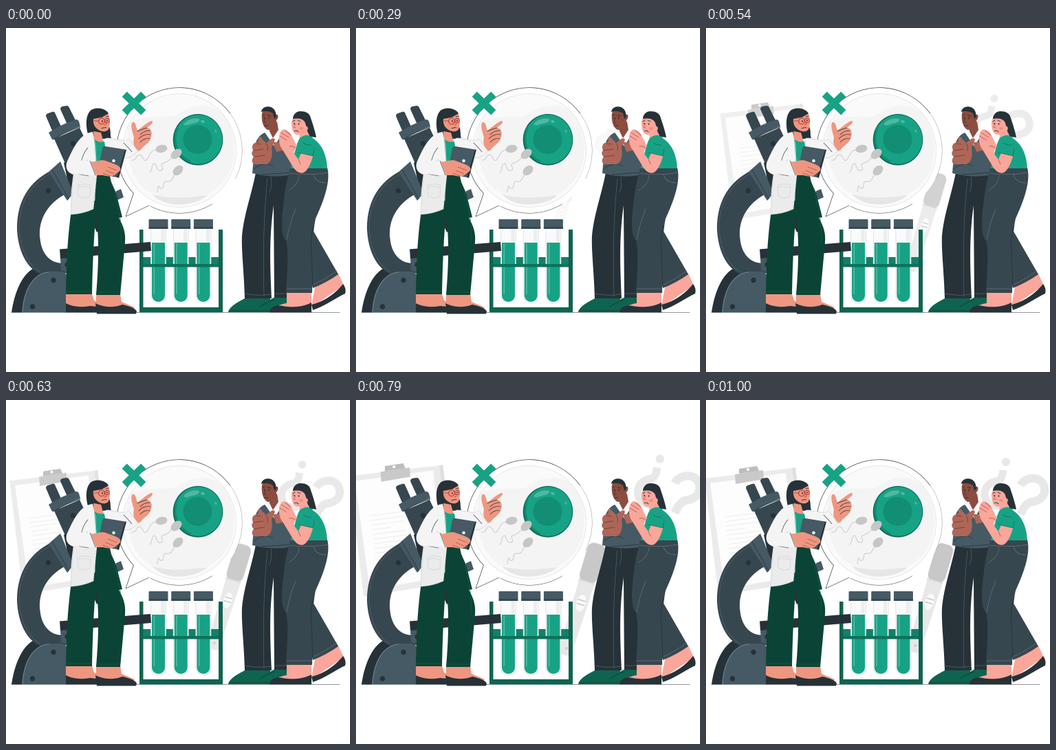
An HTML page with a canvas for the animation above (1040 ms loop, 500 by 500 pixels).

```html
<!DOCTYPE html>
<html lang="en">
<head>
<meta charset="utf-8">
<title>Clinic scene</title>
<style>
html, body { margin: 0; width: 100%; height: 100%; overflow: hidden; background: #fff; }
canvas { display: block; width: 500px; height: 500px; }
</style>
</head>
<body>
<canvas id="stage"></canvas>
<script>
const INK = '#263238', SLATE = '#37474f', STEEL = '#455a64', GREEN = '#18a285', PINE = '#0f6450',
  PANTS = '#0b4436', SKIN = '#ee9680', ROSE = '#faa69b', BROWN = '#ae6659', DARKBROWN = '#8c4d40',
  COAT = '#f4f4f4', SHADE = '#ebebeb';
const LOOP = 1040, FPS = 24, RES = 2, PAD = 20;
const CENTER = { x: 249, y: 228 };
let g;

function layer(pad, draw) {
  const c = document.createElement('canvas');
  c.width = c.height = (500 + 2 * pad) * RES;
  g = c.getContext('2d');
  g.scale(RES, RES);
  g.translate(pad, pad);
  g.lineCap = g.lineJoin = 'round';
  draw();
  return c;
}
function fill(color, d) {
  g.fillStyle = color;
  g.fill(new Path2D(d));
}
function line(color, w, d) {
  g.strokeStyle = color;
  g.lineWidth = w;
  g.stroke(new Path2D(d));
}
function oval(color, x, y, rx, ry = rx, turn = 0) {
  g.fillStyle = color;
  g.beginPath();
  g.ellipse(x, y, rx, ry, turn, 0, 7);
  g.fill();
}
function ring(color, w, x, y, r, from = 0, to = 2 * Math.PI) {
  g.strokeStyle = color;
  g.lineWidth = w;
  g.beginPath();
  g.arc(x, y, r, from, to);
  g.stroke();
}
function box(color, x, y, w, h, r = 0) {
  g.fillStyle = color;
  g.beginPath();
  g.roundRect(x, y, w, h, r);
  g.fill();
}

function clipboard() {
  fill('#e0e0e0', 'M124 99L130 98L149 262L143 264Z');
  fill('#ebebeb', 'M-2 114L125 99L144 264L18 284Z');
  fill('#fdfdfd', 'M6 121L116 106L135 255L27 275Z');
  for (let i = 0; i < 10; i++) {
    const x = 28 + i * .8, y = 170 + i * 6.6, w = i % 4 == 3 ? 26 : 46;
    line('#e8e8e8', .8, `M${x} ${y}l${w} ${-w * .13}`);
  }
  fill('#c9c9c9', 'M42 108L83 102L84 115L43 122Z');
  fill('#bdbdbd', 'M48 107V100L74 96L77 103Z');
  oval('#fff', 61, 101, 2);
}
function testStick() {
  g.save();
  g.translate(348.5, 209.5);
  g.rotate(.29);
  fill('#e8e8e8', 'M-11 50H12L9 158Q8 164 2 164H-4Q-10 164-10 158Z');
  box('#c8c8c8', -12.5, 0, 26, 56, 9);
  box('#dedede', -12, 55, 24, 2);
  oval('#fafafa', 1, 87, 6.5, 12);
  line('#c8c8c8', 1.5, 'M-4 83H6M-4 89H6');
  oval('#cfcfcf', 0, 154, 2);
  g.restore();
}
function questions() {
  g.lineCap = 'butt';
  oval('#e8e8e8', 436, 90, 6);
  line('#e8e8e8', 11, 'M432 102C430 118 426 117 418 119C404 124 402 138 409 148C414 154 424 156 430 152');
  line('#e8e8e8', 12, 'M457 124C463 112 484 110 490 122C497 138 486 146 474 148C466 149 462 156 457 166');
}

function bubble() {
  fill('#fff', 'M183 241L174 274L206 258Z');
  oval('#fff', 252, 178, 91.3);
  ring(INK, .65, 252, 178, 91.3, 2.39, 5.65);
  ring('#8d9396', .5, 252, 178, 91.3, 5.65, 6.75);
  ring(INK, .5, 252, 178, 91.3, 1.02, 2.05);
  line(INK, .65, 'M185.5 240L174 274L208 258');
  oval('#fafafa', 252, 178, 82.5);
  fill('#f4f4f4', 'M180 138C195 126 220 130 246 128C275 106 310 106 325 142C341 178 329 226 292 242C260 254 230 247 208 238C180 224 169 168 180 138Z');
  fill('#e6e6e6', 'M212 241C237 250 270 246 293 243C277 258 232 265 212 241Z');
  ring('#e0e0e0', .7, 252, 178, 82.5);

  oval('#0b6c56', 279, 162.3, 36.3, 37.3);
  oval(GREEN, 279.5, 162, 34.8, 35.8);
  line('#128a70', 3, 'M249 145C241 166 249 185 267 194');
  oval('#118e73', 278.5, 162, 21);
  fill('#4fb7a0', 'M258 140C263 133 273 130 281 132C282 136 277 138 271 139C264 141 262 143 258 140Z');
  oval('#4fb7a0', 286, 136, 3, 2, .4);
  oval('#4fb7a0', 305, 150, 1.4, 2, -.4);

  line('#d2d2d2', 1.2, 'M220 177C210 177 210 184 205 191C200 197 199 184 194 184C189 184 190 193 183 192');
  line('#d2d2d2', 1.2, 'M242 187C235 195 232 195 228 197C222 199 232 205 225 207C217 209 219 193 214 198C211 201 213 207 209 210');
  line('#d2d2d2', 1.2, 'M245 213C240 222 240 224 233 223C227 223 231 231 227 233C221 235 224 226 221 231L220 238');
  oval('#c6c6c6', 226, 175.5, 8.5, 5.6, -.2);
  oval('#c6c6c6', 247.5, 183, 9, 6, -.7);
  oval('#c6c6c6', 250, 207, 8.4, 6, -.75);

  g.lineCap = 'butt';
  line(GREEN, 10.2, 'M172.2 96.2L199.8 122.8M199.8 96.2L172.2 122.8');
  g.lineCap = 'round';
}

function rack() {
  box('#14806a', 198, 333, 112, 12);
  box(PINE, 194, 293, 5.5, 120.5);
  box(PINE, 309, 293, 6, 120.5);
  box(PINE, 199, 406, 111, 7.5);
  for (let x = 207.5; x < 280; x += 32.7) {
    box('#fafafa', x + 3, 290, 22, 110, [0, 0, 11, 11]);
    line('#d5dcdb', .7, `M${x + 3} 292V389a11 11 0 0 0 22 0V292`);
    box('#ededed', x + 18, 292, 5, 20);
    box(GREEN, x + 4.5, 312, 19, 86, [0, 0, 9.5, 9.5]);
    box('#56b9a4', x + 7, 313, 1.6, 74, 1);
    box(STEEL, x, 278, 28, 14, 1);
    box(SLATE, x, 289, 28, 3);
  }
  box('#0f705b', 199, 343, 110, 4.5);
}

function microscope() {
  fill(INK, 'M8 413.5C12 386 22 360 39 350L62 354L60 413.5Z');
  fill(SLATE, 'M66 207C34 223 16 251 16 291C17 323 30 350 51 358L93 356L93 340C70 347 52 333 49.5 306C46 276 64 250 94 238L85 208Z');
  line(STEEL, 1.2, 'M66 211C36 226 19 254 19 291C20 320 32 344 49 354');
  fill(STEEL, 'M23 413.5C25 380 39 356 62 354H79C87 354 91 361 91 372V413.5Z');
  line('#78909c', .8, 'M24 413C26 381 39 357 62 355');
  oval(INK, 61.5, 236.5, 3.7);
  oval(INK, 69, 366.5, 3.7);
  oval(INK, 38.5, 405, 3.7);
  fill(SLATE, 'M70 161L107 145L136 206L98 224Z');
  fill(INK, 'M84 196L100 190L139 291L132 297L100 225L96 252Z');
  fill(STEEL, 'M62 209L79 194L98 240L89 251Z');
  line(SLATE, 1.5, 'M67 206L91 248');
  fill(SLATE, 'M58 128Q58 125 61 124L67 122Q70 121 71 123L80 143L67 149ZM79 118Q79 115 82 114L88 113Q91 113 92 116L101 134L89 140Z');
  fill(STEEL, 'M62 152Q82 139 102 133Q105 133 106 136L108 143Q89 150 70 162Q67 163 66 160Z');
  line(INK, .7, 'M70 161Q89 150 108 144');
  oval(INK, 97.5, 168, 3.8);
  fill(STEEL, 'M158 238L167 234L171 246L162 250Z');
  fill(STEEL, 'M79 334H92V356L80 352Z');
  oval(INK, 89, 344, 3.7);
  fill(INK, 'M78 321.5L210 311L211 324L79 335Z');
}

function doctor() {
  // legs and shoes
  fill(SKIN, 'M87 386H125L128 396L148 405L145 410H87ZM131 386H166L168 398L187 406L185 409H131Z');
  fill(INK, 'M87 400C98 406 112 406 122 404C131 405 142 405 146 410V413.5H87ZM130 400C141 406 157 407 169 402C178 404 188 407 190 412L189 415.5H132Z');
  fill(PANTS, 'M96 258L133 250C128 290 126 340 125 387H87C88 340 89 305 96 258Z');
  fill(PANTS, 'M131 205H153L158 232L169 275L164 276C172 290 174 300 173 312L166 388H131C135 340 136 300 129 258Z');
  line('#155c4a', .7, 'M88 383H125M131 384H165M158 240C165 265 169 290 167 312');

  // hair and torso
  fill(INK, 'M119 154C116 143 115 126 124 119C133 114 146 117 149 126L150 143C153 150 151 156 153 160L131 162Z');
  fill(SKIN, 'M127 150L138 152L142 166L128 164Z');
  fill(GREEN, 'M127 161Q135 167 143 165L151 214H130Z');
  fill(COAT, 'M145 160C156 158 169 167 179 161L192 178C187 186 176 191 169 188L158 184L154 216L148 200Z');
  fill(COAT, 'M150 211L156 214L160 240L153 224Z');
  fill(COAT, 'M126 151C108 153 98 173 88 196C86 206 91 211 98 213L132 214L129 170Z');
  fill(SHADE, 'M98 212C94 236 94 255 94 271Q112 270 127 263L132 213Z');
  line('#cfd5d7', .7, 'M126 152L130 170L132 212L127 263Q112 270 94 271L98 213M146 161C157 159 169 167 179 161M169 188C176 191 187 186 192 178');
  line(INK, .6, 'M119 174Q111 183 109 197M98 211L120 215M102 196L119 192M171 167Q178 174 183 180');
  line('#d3d8d9', .8, 'M104 229Q113 225 123 228L122 245Q114 249 105 244ZM104 232Q113 229 122 232');

  // tablet and hands
  fill(INK, 'M144 172L175 177L164 218L161 217Z');
  fill(STEEL, 'M143 172Q141 172 140 175L133 212L161 217L173 177Z');
  oval('#eceff1', 156.5, 193, 2.3);
  fill(COAT, 'M100 193L122 192L130 214L97 212Z');
  fill(SKIN, 'M123 194C130 196 137 190 145 193C152 196 162 198 166 203C168 208 162 210 160 212C155 217 149 216 141 214L131 214Z');
  line('#8f3f38', .6, 'M148 202L161 207M145 207L157 212M141 211L151 215');
  line(INK, .6, 'M122 193L130 214');
  fill(SKIN, 'M192 179C186 174 184 167 186 159C184 151 180 141 184 137C189 136 189 145 191 149C197 145 206 136 212 135C215 137 211 141 204 145C211 145 213 152 211 158C209 168 199 171 196 177Z');
  line(INK, .7, 'M191 150L196 148Q201 146 205 145M195 155C200 150 205 149 209 149M193 161C199 155 204 154 210 155M195 166C200 161 204 160 209 161');
  line('#cfd5d7', .7, 'M180 163L192 179');

  // face
  fill(SKIN, 'M127 132C135 130 142 124 148 123C152 131 152 141 149 147C146 152 138 151 133 147Q126 142 127 132Z');
  fill(INK, 'M119 134C122 134 124 133 127 132C136 131 144 128 149 124C143 114 121 113 119 134Z');
  ring('#b32d2d', .9, 139, 135.5, 4.4);
  ring('#b32d2d', .9, 147, 134.5, 3.2);
  line('#b32d2d', .8, 'M128 135L135 135');
  oval(INK, 140, 135.5, .9, 1.4);
  oval(INK, 147, 134.5, .8, 1.3);
  line(INK, .8, 'M136 130L141 129M145 129L149 128M139 146Q143 144 146 145');
  line('#b5463e', .7, 'M144 135L146 140L143 141');
}

function man() {
  fill('#0f6450', 'M323 413C325 404 338 398 349 392H384V413ZM366 413C368 403 380 397 391 391H411V413Z');
  line('#07493a', 1, 'M324 411H384M367 411H404M369 405Q380 398 390 395');
  fill(INK, 'M363 210H417L413 392H390L389 258C382 305 384 350 386 393H347C346 355 342 324 343 302C346 270 357 242 363 210Z');
  line('#52656f', .7, 'M380 219C376 260 373 305 375 390M348 386Q365 390 385 387M391 386H411M385 216Q387 230 383 239');
  fill(STEEL, 'M376 152C363 158 360 172 360 188L358 211Q388 219 417 213L411 165L397 149L389 166Z');
  fill('#fafafa', 'M375 150L384 146L388 164L396 146L401 154L390 172Z');
  line(INK, .7, 'M360 205Q375 193 388 201M372 213L415 210M404 174Q410 180 413 190');
  fill(DARKBROWN, 'M383 140L394 136L396 148L388 160L383 150Z');
  fill(DARKBROWN, 'M372 124C374 116 388 116 392 126C396 124 397 131 393 134C393 143 388 149 380 148C373 144 371 134 372 124Z');
  fill(INK, 'M371 122C372 112 389 111 392 123L393 129L390 132L388 124Q380 119 371 122Z');
  oval(INK, 375.5, 130.5, .8, 1.2);
  oval(INK, 382, 131, .9, 1.3);
  line(INK, .9, 'M373 127L376 126M380 127L385 128M376 142L381 142');
  line('#4f2b23', .7, 'M377 131L375 137L378 138');
  fill(BROWN, 'M388 166L400 166L407 177L393 180Z');
  fill(BROWN, 'M367 165C365 158 370 156 372 161L378 167L386 161C390 159 392 162 390 165L386 174C388 185 386 195 379 198L360 198C356 194 358 190 360 187C356 184 357 180 359 178C357 173 358 168 362 167Z');
  line('#6f352e', .7, 'M360 178L374 176M361 187L376 185M364 168L371 169M378 168Q382 172 380 178');
}

function woman() {
  fill(ROSE, 'M449 377L483 357L491 374L454 399L444 404Z');
  fill(INK, 'M444 402C459 399 477 388 490 372Q495 379 493 386C478 393 464 404 446 410Z');
  fill(ROSE, 'M408 382H444V402L420 410L387 408Q399 401 408 400Z');
  fill(INK, 'M383 413.5C384 405 393 402 402 404C417 407 433 405 444 399V413.5Z');
  fill(SLATE, 'M441 285L483 358Q466 370 446 378L435 328Z');
  fill(SLATE, 'M413 203H467C472 222 463 249 450 277C445 299 446 335 445 385H407C409 350 411 326 407 309C398 300 401 272 404 250C405 233 410 218 413 203Z');
  line('#62757e', .7, 'M412 211Q440 215 468 210M426 214Q425 228 411 236M447 213Q450 225 465 225M408 379H444M447 373Q466 364 481 353M408 308Q412 285 421 263');
  line(INK, .8, 'M447 288Q442 304 444 330L446 376');
  fill(INK, 'M418 132C420 119 437 118 442 128C446 140 449 149 451 159L434 157Z');
  fill(ROSE, 'M426 147L438 146L443 164L427 166Z');
  fill(GREEN, 'M427 160Q439 151 447 161C460 170 466 185 467 204H414C419 186 421 170 427 160Z');
  fill(ROSE, 'M415 138C415 129 424 126 433 128C439 131 440 141 438 147C434 154 426 157 420 154Q415 149 415 138Z');
  fill(INK, 'M417 132C424 131 430 131 434 136C437 141 436 148 440 154L449 158Q446 123 428 121C421 121 417 127 417 132Z');
  oval(ROSE, 436.5, 146, 2.3, 3.2);
  oval(INK, 419, 139, .8, 1.2);
  oval(INK, 425.5, 139.5, .9, 1.3);
  line(INK, .9, 'M417 136L420 134M424 134L428 136M419 150Q422 148 425 151');
  line('#bf5149', .7, 'M421 139L418 144L421 145');
  oval('#f28d80', 429, 146, 3, 2);
  fill(ROSE, 'M402 177C396 170 396 157 398 154C400 147 404 146 408 149C412 150 414 154 416 158L423 172C420 176 418 178 419 183L425 191L430 179L447 183C444 194 440 206 433 210C426 213 420 207 416 200Z');
  line('#a64740', .7, 'M398 157L408 163M400 152L411 159M406 149L414 156M412 172Q417 171 420 174M425 191L428 198');
  fill(GREEN, 'M428 164Q423 176 425 181L447 186L450 170Z');
  line('#0d7761', .8, 'M425 181L446 186L448 176M432 167Q438 171 444 170');
}

const backdrop = layer(PAD, () => { clipboard(); testStick(); questions(); });
const scene = layer(0, () => {
  line(INK, .5, 'M8 413.4H485');
  bubble();
  rack();
  microscope();
  doctor();
  man();
  woman();
});

// cubic-bezier(.36, -.01, .5, 1.38): runs past the end, then settles
function ease(x) {
  const curve = (s, a, b) => 3 * (1 - s) ** 2 * s * a + 3 * (1 - s) * s * s * b + s ** 3;
  let lo = 0, hi = 1;
  for (let i = 0; i < 24; i++) {
    const mid = (lo + hi) / 2;
    if (curve(mid, .36, .5) < x) lo = mid; else hi = mid;
  }
  return curve(lo, -.01, 1.38);
}

const stage = document.getElementById('stage');
const ratio = window.devicePixelRatio || 1;
stage.width = stage.height = 500 * ratio;
const view = stage.getContext('2d');
view.scale(ratio, ratio);
view.imageSmoothingQuality = 'high';
const start = performance.now();

function render() {
  const t = Math.max(0, performance.now() - start) % LOOP;
  const step = Math.floor((t + 4) * FPS / 1000);
  const k = step < 2 ? 0 : ease(Math.min(1, step / FPS));
  const size = .5 + .5 * k, side = 500 + 2 * PAD;
  view.fillStyle = '#fff';
  view.fillRect(0, 0, 500, 500);
  view.save();
  view.globalAlpha = Math.min(1, Math.max(0, k));
  view.translate(CENTER.x, CENTER.y);
  view.scale(size, size);
  view.drawImage(backdrop, -CENTER.x - PAD, -CENTER.y - PAD, side, side);
  view.restore();
  view.drawImage(scene, 0, 0, 500, 500);
  requestAnimationFrame(render);
}
render();
</script>
</body>
</html>
```
